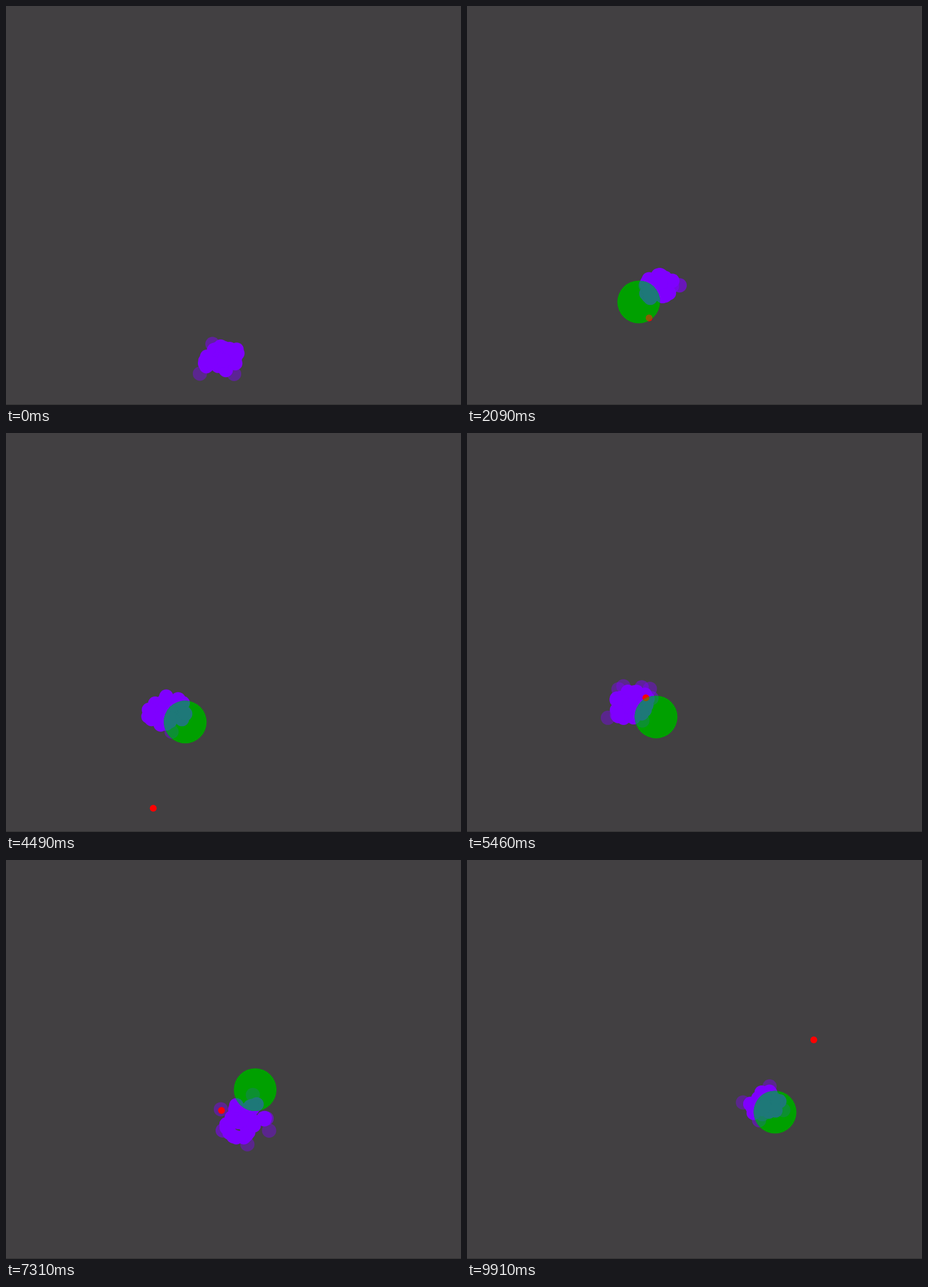
Write an HTML page with a canvas that moves like this. It is 799 px wide and 701 px high and loops after 9970 ms.

```html
<!DOCTYPE html>
<html lang="en">
<head>
<meta charset="utf-8">
<title>Swarm</title>
<style>
html, body { margin: 0; width: 100%; height: 100%; overflow: hidden; background: #424042; }
canvas { display: block; }
</style>
</head>
<body>
<canvas id="stage" width="799" height="701"></canvas>
<script>
const LOOP = 9970, END = 9.91;
const COUNT = 54, TILT = -.4, FLAT = .75;
const ctx = document.getElementById('stage').getContext('2d');

// Seconds, ball, swarm centre and reach, dot
const KEYS = [
  [0, 262, 560, 379, 620, 33, 440, 640],
  [2.09, 301.5, 520, 336, 493, 27, 319.5, 548],
  [3.49, 297, 517, 281, 499, 40, 255, 643],
  [5.46, 332, 499, 287, 477, 32, 314, 465],
  [7.31, 437.5, 403.5, 418, 457, 39, 378, 440],
  [8.34, 499.5, 417.5, 474, 402, 34, 464.5, 473],
  [9.91, 541, 443, 522, 429, 28, 609, 316]
];

let seed = 7;
function random() {
  seed = (seed * 16807) % 2147483647;
  return seed / 2147483647;
}

// The first few are loose: they stray further and fade on the way out
const particles = Array.from({ length: COUNT }, (_, i) => ({
  angle: i * 2.4,
  phase: random() * 6.28,
  speed: 1.5 + random() * 2.5,
  loose: i < 10
}));

function disc(x, y, r, color) {
  ctx.fillStyle = color;
  ctx.beginPath();
  ctx.arc(x, y, r, 0, 7);
  ctx.fill();
}

function swarm(t, cx, cy, reach, color) {
  for (const p of particles) {
    const out = .5 + .5 * Math.sin(t * p.speed + p.phase);
    const angle = p.angle + .5 * Math.sin(t + p.phase);
    const r = reach * out * (p.loose ? 1.45 : 1);
    const x = r * Math.cos(angle), y = r * FLAT * Math.sin(angle);
    ctx.globalAlpha = p.loose ? 1 - .6 * out : 1;
    disc(
      cx + x * Math.cos(TILT) - y * Math.sin(TILT),
      cy + x * Math.sin(TILT) + y * Math.cos(TILT),
      12.5, color
    );
  }
  ctx.globalAlpha = 1;
}

function draw(ms) {
  const t = Math.min(ms / 1000, END);
  const next = Math.max(1, KEYS.findIndex(k => k[0] >= t));
  const a = KEYS[next - 1], b = KEYS[next];
  const u = (t - a[0]) / (b[0] - a[0]);
  const [, bx, by, sx, sy, reach, kx, ky] = a.map((n, i) => n + (b[i] - n) * u);

  // The dot circles its straight path, widest midway between keys
  const swing = 110 * Math.sin(Math.PI * u);
  const dx = kx + swing * Math.cos(6 * t), dy = ky + swing * Math.sin(6 * t);

  ctx.fillStyle = '#424042';
  ctx.fillRect(0, 0, 799, 701);
  ctx.fillStyle = '#302f30';
  ctx.fillRect(0, 700, 799, 1);
  swarm(t, sx, sy, reach, '#7f00ff');
  if (ms < 30) return;

  disc(dx, dy, 6, '#ff0000');
  disc(bx, by, 37.5, '#00a000');
  ctx.save();
  ctx.clip();
  swarm(t, sx, sy, reach, '#1e7878');
  disc(dx, dy, 6, '#8c5a05');
  ctx.restore();
}

const start = performance.now();
function tick() {
  draw((performance.now() - start) % LOOP);
  requestAnimationFrame(tick);
}
tick();
</script>
</body>
</html>
```
